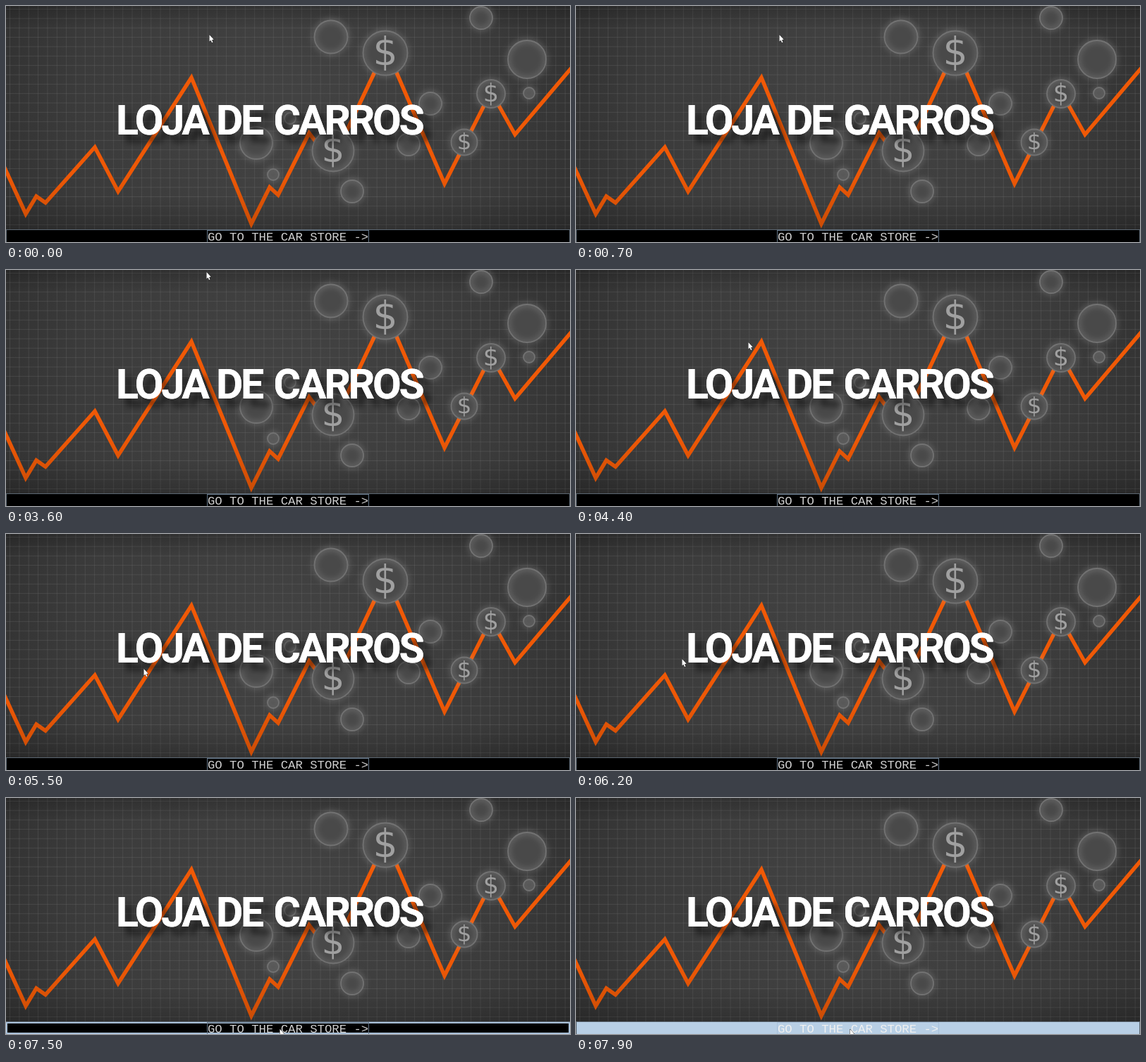
An HTML page with a canvas that plays this animation: 800x336 px, repeating every 8000 ms.

```html
<!DOCTYPE html>
<html lang="pt">
<head>
<meta charset="utf-8">
<title>Loja de carros</title>
<style>
  html, body { margin: 0; width: 100%; height: 100%; overflow: hidden; background: #000; }
  canvas { display: block; }
</style>
</head>
<body>
<canvas id="stage" width="800" height="336"></canvas>
<script>
const W = 800, H = 336, BAR_TOP = 319;
const LOOP = 8000, STEP = 100;
const HOVER_AT = 7300, PRESS_AT = 7900;
const stage = document.getElementById('stage').getContext('2d');

// Turning points of the price line
const chart = [
  [-3, 228], [28, 296], [43, 271], [56, 280], [126, 201], [159, 264], [263, 102],
  [348, 310], [374, 258], [386, 269], [430, 181], [462, 223], [539, 60],
  [622, 253], [688, 122], [722, 183], [803, 87]
];

// x, y, radius
const bubbles = [
  [461, 44, 23.5], [674, 17, 16], [739, 76, 27], [742, 124, 8], [602, 139, 16],
  [571, 197, 16], [355, 195, 23], [403, 160, 8], [379, 240, 8], [491, 264, 16]
];
const coins = [[538, 67, 31.5], [688, 125, 20], [650, 194, 18.5], [464, 206, 29.5]];

// time, x, y; between visits the pointer is outside the window
const visits = [
  [[0, 288, 41], [2500, 288, 41], [2600, 284, 31], [2900, 284, 31]],
  [[3500, 290, 3], [3700, 278, 3]],
  [[4000, 281, 6], [4400, 244, 103], [4800, 228, 177], [5500, 195, 192],
   [6200, 150, 178], [6800, 538, 205], [7300, 388, 325], [7500, 388, 329], [LOOP, 388, 329]]
];

function tracePath(ctx, points) {
  ctx.beginPath();
  points.forEach(([x, y]) => ctx.lineTo(x, y));
}

function verticalFade(ctx, bottom, stops) {
  const fade = ctx.createLinearGradient(0, 0, 0, bottom);
  stops.forEach(([at, color]) => fade.addColorStop(at, color));
  return fade;
}

function drawBackdrop(ctx) {
  const light = ctx.createRadialGradient(400, 160, 40, 400, 160, 470);
  light.addColorStop(0, '#424242');
  light.addColorStop(0.6, '#3b3b3b');
  light.addColorStop(1, '#2f2f2f');
  ctx.fillStyle = light;
  ctx.fillRect(0, 0, W, H);

  ctx.fillStyle = 'rgba(125,125,125,.25)';
  const pitch = 13.35;
  for (let x = 5; x < W; x += pitch) ctx.fillRect(x, 0, 1, H);
  for (let y = 4; y < H; y += pitch) ctx.fillRect(0, y, W, 1);

  ctx.fillStyle = verticalFade(ctx, BAR_TOP, [
    [0, 'rgba(0,0,0,.2)'], [0.1, 'rgba(0,0,0,0)'], [0.85, 'rgba(0,0,0,0)'], [1, 'rgba(0,0,0,.2)']
  ]);
  ctx.fillRect(0, 0, W, BAR_TOP);
}

function drawChart(ctx) {
  ctx.strokeStyle = verticalFade(ctx, BAR_TOP, [[0, '#f25a06'], [0.75, '#ee5806'], [1, '#c94c06']]);
  ctx.lineWidth = 5.5;
  tracePath(ctx, chart);
  ctx.stroke();
}

function drawBubble(ctx, [x, y, r]) {
  ctx.save();
  ctx.beginPath();
  ctx.arc(x, y, r, 0, Math.PI * 2);
  ctx.fillStyle = '#494949';
  ctx.fill();
  ctx.shadowColor = 'rgba(190,190,190,.8)';
  ctx.shadowBlur = 8;
  ctx.strokeStyle = '#727272';
  ctx.lineWidth = 1.8;
  ctx.stroke();
  ctx.restore();
}

function drawCoin(ctx, [x, y, r]) {
  const size = r * 1.75;
  drawBubble(ctx, [x, y, r]);
  ctx.font = `${size}px "DejaVu Sans", sans-serif`;
  ctx.textAlign = 'center';
  ctx.fillStyle = '#a0a0a0';
  ctx.fillText('$', x, y + size * 0.31);
}

function drawTitle(ctx) {
  const write = () => {
    ctx.fillText('LOJA', 156, 183);
    ctx.fillText('DE', 298, 183);
    ctx.fillText('CARROS', 379.5, 183);
  };
  ctx.save();
  ctx.font = '600 59px Roboto, sans-serif';
  ctx.letterSpacing = '-3.3px';
  ctx.textAlign = 'left';
  ctx.fillStyle = '#fff';
  ctx.shadowColor = 'rgba(0,0,0,.5)';
  ctx.shadowBlur = 9;
  ctx.shadowOffsetX = 10;
  ctx.shadowOffsetY = 11;
  write();
  ctx.shadowColor = 'transparent';
  write();
  ctx.restore();
}

function makeScene() {
  const canvas = document.createElement('canvas');
  canvas.width = W;
  canvas.height = H;
  const ctx = canvas.getContext('2d');
  drawBackdrop(ctx);
  drawChart(ctx);
  bubbles.forEach(bubble => drawBubble(ctx, bubble));
  coins.forEach(coin => drawCoin(ctx, coin));
  drawTitle(ctx);
  return canvas;
}

function drawButton(ctx, hovered, pressed) {
  const height = H - BAR_TOP;
  ctx.fillStyle = pressed ? '#b8cfe5' : '#000';
  ctx.fillRect(0, BAR_TOP, W, height);
  ctx.lineWidth = 1;
  ctx.strokeStyle = '#5c6772';
  ctx.strokeRect(0.5, BAR_TOP - 0.5, W - 1, height + 2);
  if (hovered && !pressed) {
    ctx.lineWidth = 2;
    ctx.strokeStyle = '#a9c0d8';
    ctx.strokeRect(1, BAR_TOP + 1, W - 2, height - 2);
  }
  ctx.lineWidth = 1;
  ctx.strokeStyle = pressed ? '#a9c1da' : '#66788a';
  ctx.strokeRect(285.5, BAR_TOP + 0.5, 229, height + 1);
  ctx.font = '17.3px "Liberation Mono", monospace';
  ctx.textAlign = 'left';
  ctx.fillStyle = pressed ? '#f0f0f0' : '#cfcfcf';
  ctx.fillText('GO TO THE CAR STORE ->', 286, 334);
}

function pointerAt(time) {
  const path = visits.find(v => time >= v[0][0] && time < v[v.length - 1][0]);
  if (!path) return null;
  const i = path.findIndex(key => key[0] > time);
  const [t0, x0, y0] = path[i - 1], [t1, x1, y1] = path[i];
  const k = (time - t0) / (t1 - t0);
  return [Math.round(x0 + (x1 - x0) * k), Math.round(y0 + (y1 - y0) * k)];
}

function drawPointer(ctx, [x, y]) {
  ctx.save();
  ctx.translate(x + 0.5, y);
  tracePath(ctx, [[0, 0], [0, 9.5], [2, 7.8], [3.6, 11.2], [5, 10.5], [3.6, 7.2], [6.2, 6.8]]);
  ctx.closePath();
  ctx.lineWidth = 1;
  ctx.strokeStyle = '#1a1a1a';
  ctx.stroke();
  ctx.fillStyle = '#fff';
  ctx.fill();
  ctx.restore();
}

const scene = makeScene();
const start = performance.now();
let shownTime = -1;

function tick() {
  const elapsed = (performance.now() - start) % LOOP;
  const time = Math.floor(elapsed / STEP) * STEP;
  if (time !== shownTime) {
    shownTime = time;
    stage.drawImage(scene, 0, 0);
    drawButton(stage, time >= HOVER_AT, time >= PRESS_AT);
    const pointer = pointerAt(time);
    if (pointer) drawPointer(stage, pointer);
  }
  requestAnimationFrame(tick);
}
tick();
</script>
</body>
</html>
```
